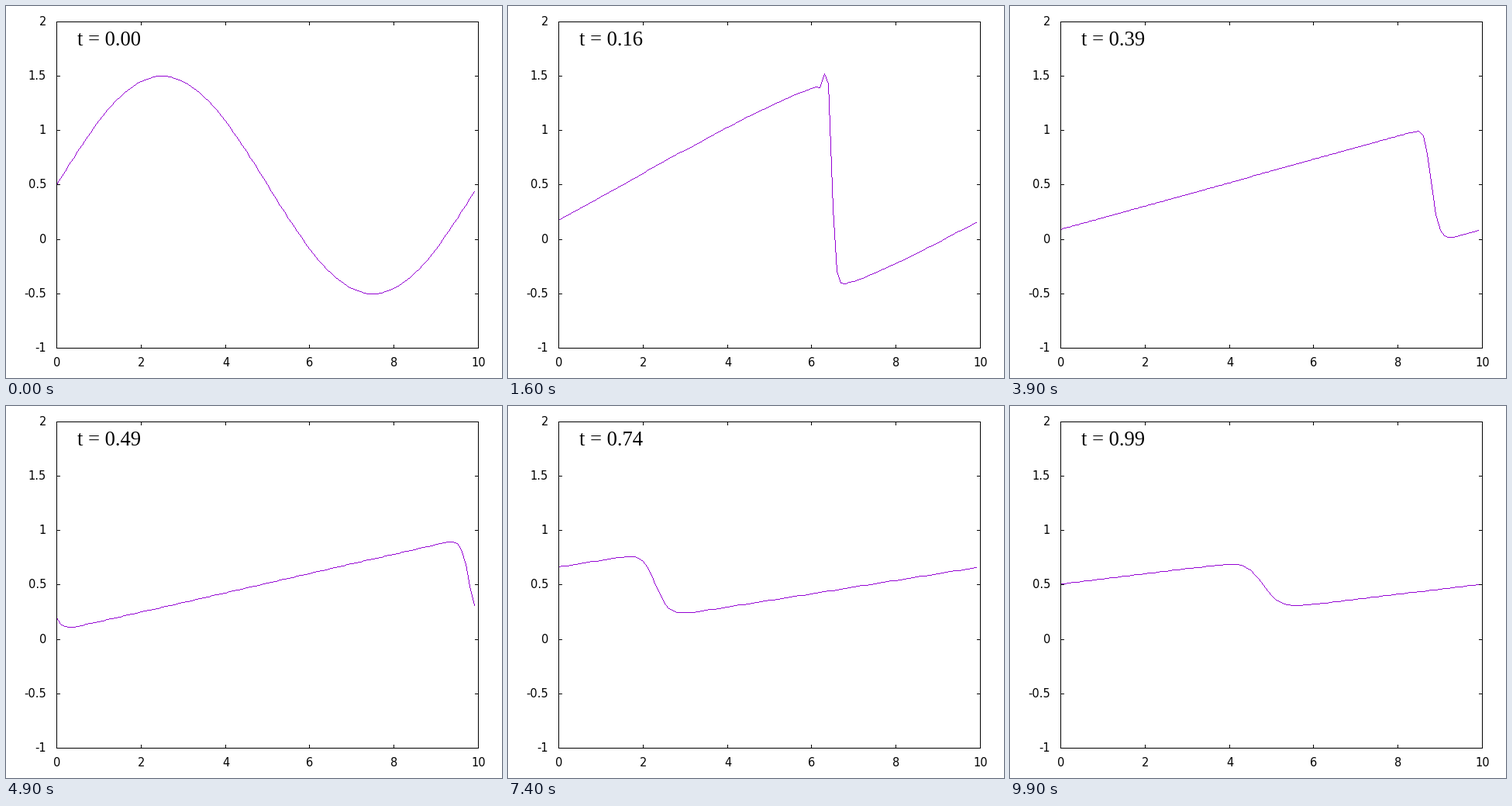
Animation of 640 by 480 pixels, one loop 10 s. Source, as a matplotlib script:

```python
import numpy as np
import matplotlib.pyplot as plt
from matplotlib.animation import FuncAnimation

W, H, DPI = 640, 480, 100
LEFT, RIGHT, TOP, BOTTOM = 65, 609, 20, 441
TIC = 5
FRAMES = 100

# Viscous Burgers equation on a periodic grid
N, LENGTH = 100, 10.0
DX, DT, NU = LENGTH / N, 0.01, 0.05
STEPS = 20


def pt(px):
    return px * 72 / DPI


def to_int(v):
    return np.floor(np.asarray(v) + 0.5).astype(int)


def px_x(x):
    return LEFT + to_int((RIGHT - LEFT) * np.asarray(x) / 10)


def px_y(u):
    return BOTTOM - to_int((BOTTOM - TOP) * (np.asarray(u) + 1) / 3)


def step(u):
    right, left = np.roll(u, -1), np.roll(u, 1)
    advection = u * (right - left) / (2 * DX)
    diffusion = NU * (right - 2 * u + left) / DX**2
    return u + DT * (diffusion - advection)


def solve(x):
    """Wave profile for each frame; the first two show the initial state."""
    u = 0.5 + np.sin(2 * np.pi * x / LENGTH)
    rows = [u, u]
    while len(rows) < FRAMES:
        for _ in range(STEPS):
            u = step(u)
        rows.append(u)
    return rows


def segment(p, q):
    """Pixels of a thin line, one per step along its longer side."""
    axis = int(np.argmax(np.abs(q - p)))
    if q[axis] < p[axis]:
        p, q = q, p
    d = q - p
    n = max(d[axis], 1)
    k = np.arange(n + 1)[:, None]
    return p + np.sign(d) * to_int(np.abs(d) * k / n)


def thin_line(xs, ys):
    """Crisp one-pixel polyline as short dashes separated by gaps."""
    pts = np.column_stack([xs, ys])
    dots = np.unique(np.vstack([segment(p, q) for p, q in zip(pts, pts[1:])]), axis=0)
    x, y = dots.T
    gap = np.full(len(x), np.nan)
    return (np.column_stack([x, x + 1, gap]).ravel(),
            np.column_stack([y + 0.5, y + 0.5, gap]).ravel())


plt.rcParams["path.simplify"] = False
fig = plt.figure(figsize=(W / DPI, H / DPI), dpi=DPI, facecolor="white")
ax = fig.add_axes([0, 0, 1, 1])
ax.set_xlim(0, W)
ax.set_ylim(H, 0)
ax.axis("off")


def stroke(xs, ys, color="black", zorder=3):
    line, = ax.plot(xs, ys, color=color, lw=pt(1), antialiased=False, snap=False,
                    solid_capstyle="butt", zorder=zorder)
    return line


def label(x, y, text, ha):
    ax.text(x, y, text, ha=ha, va="baseline", family="DejaVu Sans",
            fontsize=pt(14.67), color="black")


for y in (TOP + 0.5, BOTTOM + 0.5):
    stroke([LEFT, RIGHT + 1], [y, y])
for x in (LEFT + 0.5, RIGHT + 0.5):
    stroke([x, x], [TOP, BOTTOM + 1])

for v in range(0, 11, 2):
    x = px_x(v) + 0.5
    stroke([x, x], [TOP, TOP + TIC])
    stroke([x, x], [BOTTOM + 1 - TIC, BOTTOM + 1])
    label(x, 465, f"{v}", "center")

for v in np.arange(-1, 2.1, 0.5):
    y = px_y(v) + 0.5
    stroke([LEFT, LEFT + TIC], [y, y])
    stroke([RIGHT + 1 - TIC, RIGHT + 1], [y, y])
    label(52, y + 4.5, f"{v:g}", "right")

grid = np.arange(N) * DX
waves = solve(grid)
curve = stroke([], [], "#9400d3", zorder=2)
clock = ax.text(92, 51, "", ha="left", va="baseline", family="Liberation Serif",
                fontsize=pt(26.67), color="black")


def draw(i):
    curve.set_data(*thin_line(px_x(grid), px_y(waves[i])))
    clock.set_text(f"t = {i / 100:.2f}")
    return curve, clock


anim = FuncAnimation(fig, draw, frames=FRAMES, interval=100, repeat=True)
plt.show()
```
